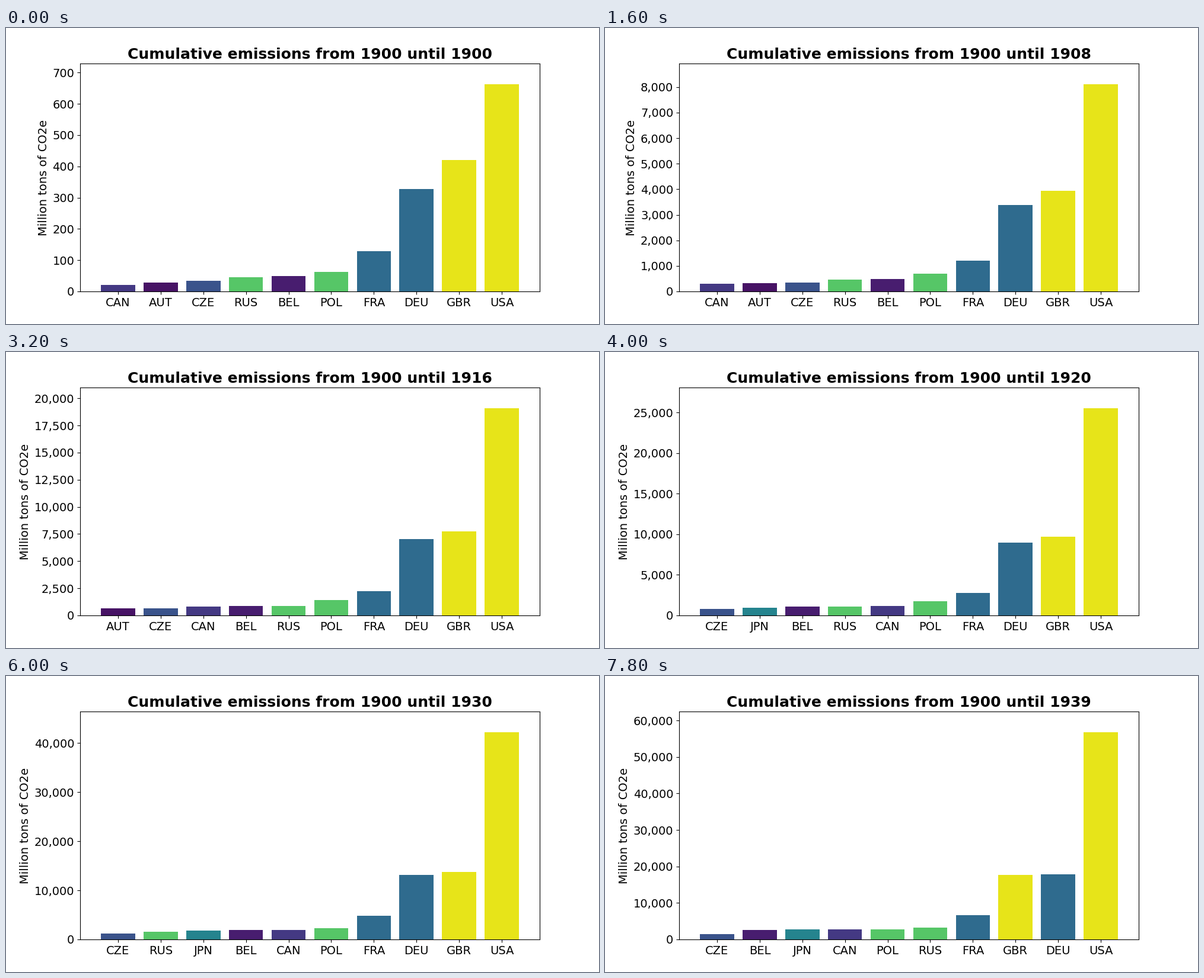
These frames come from a looping animation (1000 px wide and 500 px high, 8 s). A matplotlib script:

```python
import matplotlib.pyplot as plt
import numpy as np
from matplotlib.animation import FuncAnimation
from matplotlib.ticker import StrMethodFormatter

YEARS = np.arange(1900, 1940)
KEY_YEARS = np.array([1900, 1912, 1920, 1930, 1939])
TOP = 10

# Country: viridis shade, then cumulative emissions at the key years
COUNTRIES = {
    "AUT": (0.05, 28, 495, 760, 880, 1000),
    "BEL": (0.08, 49, 700, 1070, 1870, 2580),
    "CAN": (0.167, 21, 540, 1150, 1980, 2740),
    "CZE": (0.255, 34, 515, 800, 1210, 1500),
    "DEU": (0.345, 328, 5130, 8965, 13200, 17870),
    "FRA": (0.345, 129, 1750, 2770, 4860, 6640),
    "GBR": (0.962, 420, 5800, 9694, 13700, 17690),
    "JPN": (0.45, 18, 330, 930, 1750, 2690),
    "POL": (0.738, 62, 1050, 1740, 2340, 2790),
    "RUS": (0.738, 45, 690, 1085, 1560, 3220),
    "USA": (0.962, 662.7, 13150, 25535, 42200, 56790),
}


def grow(totals):
    """Cubic curve through the key totals, one value per year."""
    y = np.array(totals, float)
    slope = np.gradient(y, KEY_YEARS, edge_order=2)
    slope[0] = y[0]  # the first total is also the first year's growth
    i = np.clip(np.searchsorted(KEY_YEARS, YEARS, side="right") - 1,
                0, len(KEY_YEARS) - 2)
    h = KEY_YEARS[i + 1] - KEY_YEARS[i]
    t = (YEARS - KEY_YEARS[i]) / h
    ease = t * t * (3 - 2 * t)
    bend = h * t * (1 - t) * (slope[i] * (1 - t) - slope[i + 1] * t)
    return y[i] + (y[i + 1] - y[i]) * ease + bend


series = {name: grow(totals) for name, (_, *totals) in COUNTRIES.items()}
colors = {name: plt.cm.viridis(row[0]) for name, row in COUNTRIES.items()}

plt.rcParams["font.family"] = "DejaVu Sans"
fig = plt.figure(figsize=(10, 5), dpi=100)
ax = fig.add_axes([0.125, 0.11, 0.775, 0.77])


def draw(frame):
    ax.clear()
    ranked = sorted(series, key=lambda name: series[name][frame])[-TOP:]
    heights = [series[name][frame] for name in ranked]
    ax.bar(range(TOP), heights, color=[colors[name] for name in ranked])
    ax.set_ylim(0, 1.1 * heights[-1])
    ax.set_xticks(range(TOP), ranked)
    ax.tick_params(labelsize=14)
    ax.yaxis.set_major_formatter(StrMethodFormatter("{x:,.0f}"))
    ax.set_ylabel("Million tons of CO2e", fontsize=14)
    ax.set_title(f"Cumulative emissions from {YEARS[0]} until {YEARS[frame]}",
                 fontsize=18, fontweight="bold")
    return []


anim = FuncAnimation(fig, draw, frames=len(YEARS), init_func=lambda: draw(0),
                     interval=200, repeat=True, repeat_delay=0)
plt.show()
```
